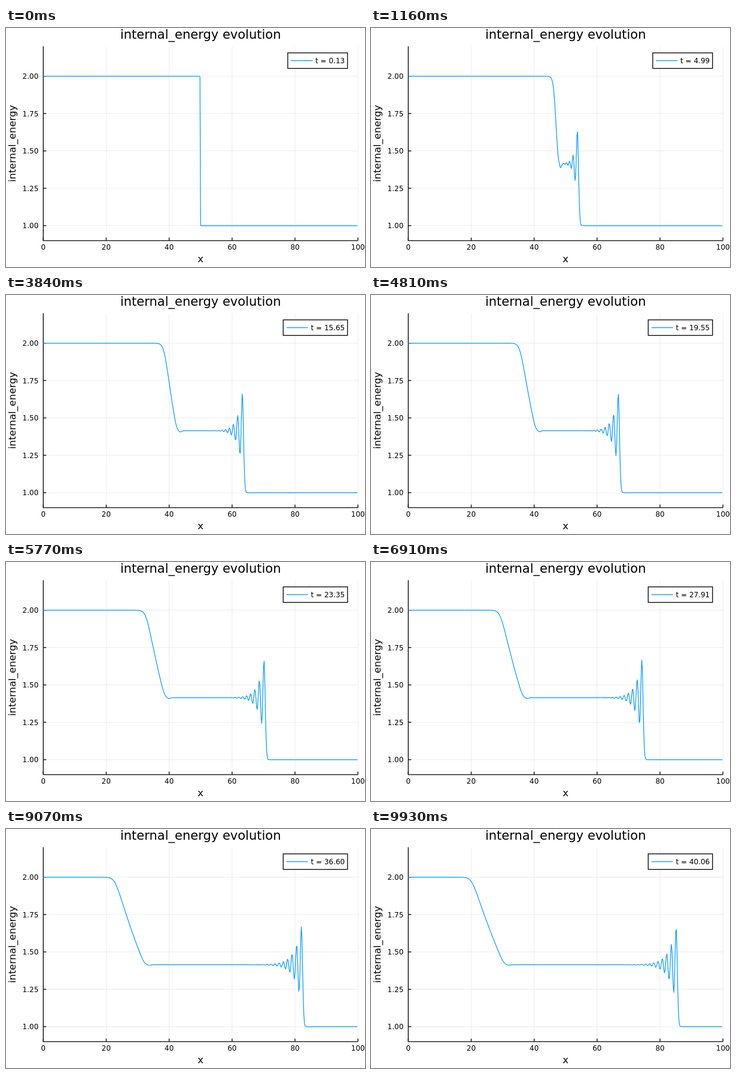
These frames come from a looping animation (600x400 px, 9950 ms). An HTML page with a canvas:

```html
<!DOCTYPE html>
<html lang="en">
<head>
<meta charset="utf-8">
<title>internal_energy evolution</title>
<style>
  html, body { margin: 0; width: 100%; height: 100%; overflow: hidden; background: #fff; }
  canvas { display: block; }
</style>
</head>
<body>
<canvas id="plot" width="600" height="400"></canvas>
<script>
const ctx = document.getElementById('plot').getContext('2d');
const LOOP = 9950, FPS = 43, LAST = 427;
const LEFT = 62.3, RIGHT = 588.2, TOP = 30.6, BOTTOM = 355.8;
const BLUE = '#009afa';
const SOUND = 0.748, FAN = Math.LN2 / 2;

const px = x => LEFT + x * (RIGHT - LEFT) / 100;
const py = e => BOTTOM - (e - 0.9) * (BOTTOM - TOP) / 1.3;

function line(points, color, width) {
  ctx.beginPath();
  for (const [x, y] of points) ctx.lineTo(x, y);
  ctx.strokeStyle = color;
  ctx.lineWidth = width;
  ctx.stroke();
}

function text(str, x, y, size, align) {
  ctx.font = size + 'px "DejaVu Sans", sans-serif';
  ctx.textAlign = align;
  ctx.fillStyle = '#000';
  ctx.fillText(str, x, y);
}

// Simulated time: the step shrinks quickly at first, then grows slightly.
const simTime = i =>
  0.13 + 0.09273 * i + 0.22 * (1 - Math.exp(-i / 8)) + 0.00073 * Math.max(0, i - 275);

const softplus = (z, w) => z > 30 * w ? z : w * Math.log1p(Math.exp(z / w));

// Rarefaction fan to the left, damped wave train behind a shock to the right.
function profile(t) {
  const age = Math.max(t - 0.13, 0.001);
  const spread = Math.cbrt(age);
  const head = 50 - SOUND * age;
  const tail = head + FAN * SOUND * age;
  const dip = Math.min(0.14 / age, 0.03) * (1 - Math.exp(-age));
  const crest = 49.9 + 0.896 * age - 0.57 * (1 - Math.exp(-age / 1.5));
  const amplitude = 0.255 * (1 - Math.exp(-age / 2));
  const decay = 0.49 * age ** 0.43;
  const front = 0.02 + 0.53 * (1 - Math.exp(-2 * age));

  const fan = x => {
    const drop = softplus(x - head, 0.21 * spread) - softplus(x - tail, 0.12 * spread);
    const off = (x - tail - 0.45 * spread) / (0.22 * spread);
    return 2 * Math.exp(-drop / (SOUND * age)) - dip * Math.exp(-off * off);
  };
  const peak = fan(crest) + amplitude;

  return x => {
    const d = crest - x;
    if (d < 0) return 1 + (peak - 1) * Math.exp(-((d / front) ** 2));
    const phase = 2 * Math.PI * d * (0.65 + 0.3 * d / age);
    return fan(x) + amplitude * Math.exp(-d / decay) * Math.cos(phase);
  };
}

function drawAxes() {
  const xTicks = [0, 20, 40, 60, 80, 100], yTicks = [1, 1.25, 1.5, 1.75, 2];
  for (const v of xTicks) line([[px(v), TOP], [px(v), BOTTOM]], 'rgba(0,0,0,.1)', 0.75);
  for (const v of yTicks) line([[LEFT, py(v)], [RIGHT, py(v)]], 'rgba(0,0,0,.1)', 0.75);
  line([[LEFT, TOP], [LEFT, BOTTOM], [RIGHT, BOTTOM]], '#000', 1.3);
  for (const v of xTicks) {
    line([[px(v), BOTTOM], [px(v), BOTTOM - 5]], '#000', 1.3);
    text(v, px(v), 371.4, 12, 'center');
  }
  for (const v of yTicks) {
    line([[LEFT, py(v)], [LEFT + 5, py(v)]], '#000', 1.3);
    text(v.toFixed(2), 54.3, py(v) + 4.5, 12, 'right');
  }
  text('internal_energy evolution', 325.2, 18, 21, 'center');
  text('x', 325.2, 391.7, 16.5, 'center');
  ctx.save();
  ctx.translate(16, 193.2);
  ctx.rotate(-Math.PI / 2);
  text('internal_energy', 0, 0, 16.5, 'center');
  ctx.restore();
}

function drawLegend(t) {
  const label = 't = ' + t.toFixed(2);
  const x = label.length > 8 ? 463.3 : 470.9;
  ctx.fillStyle = '#fff';
  ctx.fillRect(x, 41.6, 570.8 - x, 26);
  ctx.strokeStyle = '#000';
  ctx.lineWidth = 1.3;
  ctx.strokeRect(x, 41.6, 570.8 - x, 26);
  line([[x + 5.3, 54.6], [x + 41.3, 54.6]], BLUE, 1.2);
  text(label, x + 46.2, 59.1, 12, 'left');
}

function draw(now) {
  const tick = Math.floor(now % LOOP / 10);
  const step = Math.min(LAST, Math.ceil((tick + 0.5) * FPS / 100) - 1);
  const t = simTime(step);
  const energy = profile(t);
  const curve = Array.from({ length: 500 }, (_, k) => [px(k / 5), py(energy(k / 5))]);

  ctx.fillStyle = '#fff';
  ctx.fillRect(0, 0, 600, 400);
  drawAxes();
  ctx.lineJoin = 'round';
  line(curve, BLUE, 1.2);
  ctx.lineJoin = 'miter';
  drawLegend(t);
}

function loop() {
  draw(performance.now());
  requestAnimationFrame(loop);
}
loop();
</script>
</body>
</html>
```
